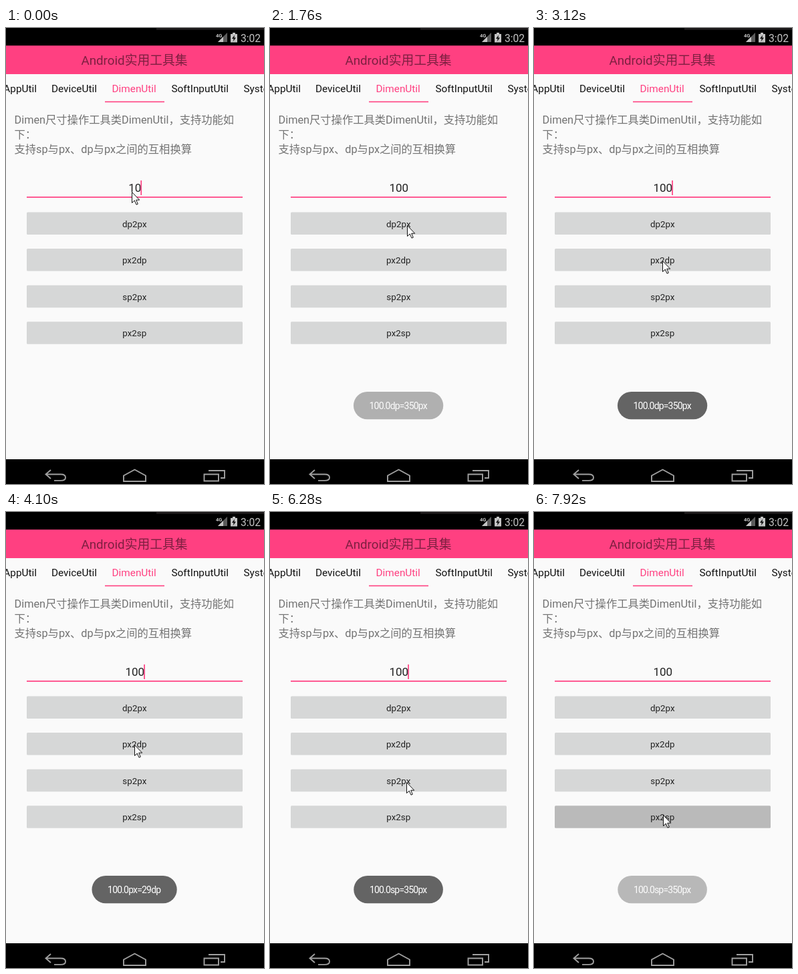
Recreate the animation shown at these times as an HTML page. Size 386 px wide and 682 px high, loop 8000 ms.

```html
<!DOCTYPE html>
<html lang="zh-CN">
<head>
<meta charset="utf-8">
<style>
html, body { margin: 0; width: 100%; height: 100%; overflow: hidden; background: #fafafa; }
svg { display: block; width: 386px; height: 682px; font-family: Roboto, "Noto Sans CJK SC", sans-serif; }
.mid { text-anchor: middle; }
.tab { font-size: 15.35px; fill: #111; }
.active { fill: #ff4081; }
.desc { font-size: 16.3px; fill: #737373; }
.mark { font-family: "Noto Sans CJK TC", sans-serif; }
.button { font-size: 13.4px; fill: #222; }
.toast { font-size: 14px; letter-spacing: -.82px; fill: #fff; }
.nav { fill: none; stroke: #a0a0a0; stroke-width: 1.9; }
</style>
</head>
<body>
<svg viewBox="0 0 386 682">
  <rect width="386" height="682" fill="#fafafa"/>

  <rect width="386" height="26"/>
  <rect x="225" width="161" height="3" fill="#1b1819"/>
  <g fill="#c4c4c4">
    <text x="314" y="13.5" font-size="7.5" font-weight="700">4G</text>
    <path d="M331 7V21H317Z" fill="#5c5c5c"/>
    <path d="M325 13V21H317Z"/>
    <path d="M339 7h4v2h3v12.5h-10V9h3Z"/>
    <path d="M342 10.5L338 16h2.5L340 20l4-5.5h-2.5Z" fill="#111"/>
    <text x="351" y="20.5" font-size="15.6">3:02</text>
  </g>

  <rect y="26" width="386" height="43" fill="#ff4081"/>
  <rect y="26" width="386" height="1" fill="#b82e5d"/>
  <text class="mid" x="192" y="55" font-size="18.8" fill="#7d1f40">Android实用工具集</text>

  <text class="tab" x="46" y="96" text-anchor="end">AppUtil</text>
  <text class="tab" x="68" y="96">DeviceUtil</text>
  <text class="tab active" x="158.5" y="96">DimenUtil</text>
  <text class="tab" x="247.5" y="96">SoftInputUtil</text>
  <text class="tab" x="355.5" y="96">SystemUtil</text>
  <rect class="active" x="148" y="109.6" width="89" height="1.6"/>

  <text class="desc" x="12.5" y="143">Dimen尺寸操作工具类DimenUtil<tspan class="mark">，</tspan>支持功能如</text>
  <text class="desc" x="12.5" y="165">下<tspan class="mark">：</tspan></text>
  <text class="desc" x="12.5" y="187">支持sp与px、dp与px之间的互相换算</text>

  <text id="value" class="mid" x="192.8" y="245" font-size="17" fill="#222"></text>
  <rect id="caret" class="active" y="228" width="1.7" height="22"/>
  <rect class="active" x="31" y="252.2" width="323" height="1.7"/>

  <g id="buttons"></g>
  <g id="toasts"></g>

  <rect y="645" width="386" height="37"/>
  <g class="nav">
    <path d="M67 661L59.5 667.5 67 674M60 667.5H82q7 0 7 4.700t-7 4.700H72"/>
    <path d="M176 678V669.500L192.500 660.500 209 669.500V678Z"/>
    <path d="M296.500 667.500H318V677.500H296.500ZM303 662H327V673H321"/>
  </g>

  <path id="cursor" d="M.5.5V16.5L4.300 13 7 19.200 9.300 18.200 6.700 12.200H11.700Z" fill="#fff" stroke="#111"/>
</svg>
<script>
const LOOP = 8000;
const TYPE_AT = 130;
const BLINK = 493;
const GLIDE = 350;
const FADE = 250;
const TOAST_DELAY = 32;

// The pointer reaches (x, y) at `arrive`, taps at `tap` and holds for `hold`.
const steps = [
  { label: 'dp2px', toast: '100.0dp=350px', arrive: 1230, tap: 1606, hold: 150, x: 205, y: 295 },
  { label: 'px2dp', toast: '100.0px=29dp', arrive: 2850, tap: 3550, hold: 150, x: 192, y: 348 },
  { label: 'sp2px', toast: '100.0sp=350px', arrive: 4800, tap: 5668, hold: 0, x: 204, y: 404 },
  { label: 'px2sp', arrive: 6850, tap: 7780, hold: 220, x: 193, y: 453 }
];

const $ = id => document.getElementById(id);
const clamp = v => Math.min(1, Math.max(0, v));
const smooth = v => v * v * (3 - 2 * v);

function add(parent, tag, attrs, text = '') {
  const node = document.createElementNS('http://www.w3.org/2000/svg', tag);
  for (const key in attrs) node.setAttribute(key, attrs[key]);
  node.textContent = text;
  return parent.appendChild(node);
}

steps.forEach((step, i) => {
  const y = 275.5 + i * 54.6;
  step.rect = add($('buttons'), 'rect', { x: 31, y, width: 323, height: 33.5, rx: 1.5 });
  add($('buttons'), 'text', { class: 'mid button', x: 192.3, y: y + 22 }, step.label);
  if (!step.toast) return;

  step.group = add($('toasts'), 'g', {});
  const pill = add(step.group, 'rect', { y: 544, height: 41.3, rx: 20.6, fill: '#646464' });
  const label = add(step.group, 'text', { class: 'mid toast', x: 191.7, y: 570.3 }, step.toast);
  const width = label.getComputedTextLength() + 48;
  pill.setAttribute('x', 192.1 - width / 2);
  pill.setAttribute('width', width);
});

function draw(t) {
  const typed = t >= TYPE_AT;
  const blinks = Math.floor((t - TYPE_AT) / BLINK);
  $('value').textContent = typed ? '100' : '10';
  $('caret').setAttribute('x', typed ? 206.2 : 201.4);
  $('caret').setAttribute('opacity', typed && blinks % 2 ? 0 : 1);

  let x = 188, y = 245;
  steps.forEach((step, i) => {
    const pressed = t >= step.tap && t < step.tap + step.hold;
    step.rect.setAttribute('fill', pressed ? '#bababa' : '#d6d7d7');

    const glide = smooth(clamp((t - step.arrive) / GLIDE + 1));
    x += (step.x - x) * glide;
    y += (step.y - y) * glide;

    if (!step.group) return;
    const shown = clamp((t - step.tap - TOAST_DELAY) / FADE);
    const hidden = clamp((t - steps[i + 1].tap) / FADE);
    step.group.setAttribute('opacity', shown * (1 - hidden));
  });
  $('cursor').setAttribute('transform', `translate(${Math.round(x)} ${Math.round(y)})`);
}

const origin = performance.now();
function tick() {
  draw((performance.now() - origin) % LOOP);
  requestAnimationFrame(tick);
}
tick();
</script>
</body>
</html>
```
